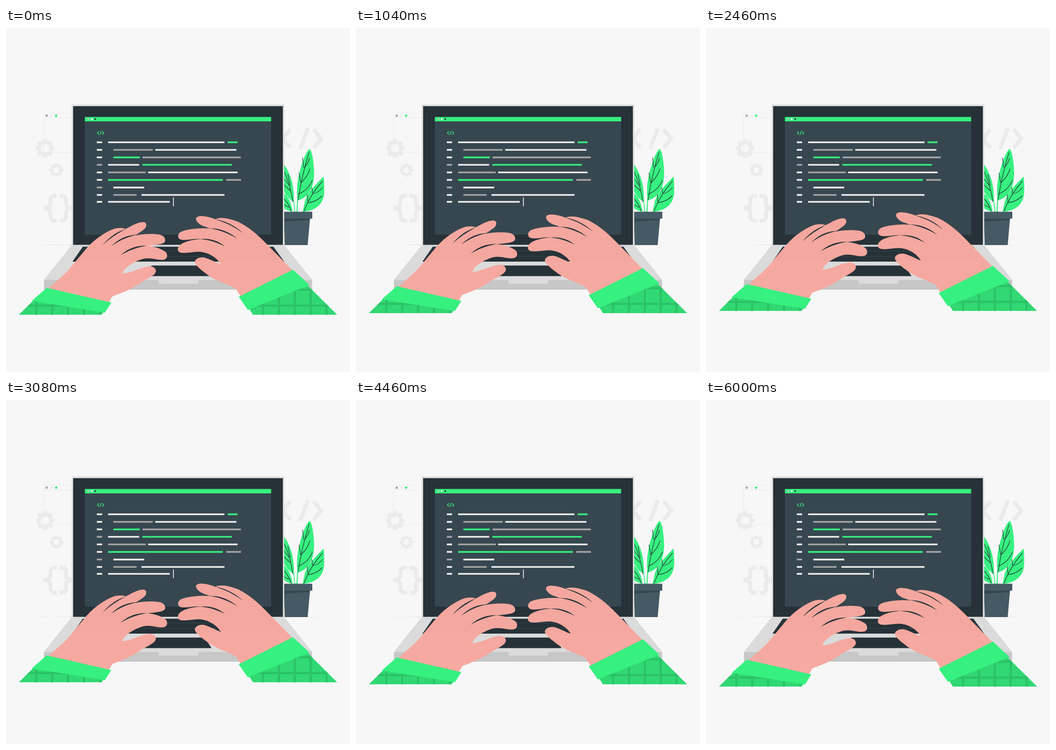
An HTML page that plays this animation: 748 px wide and 748 px high, repeating every 6040 ms.

```html
<!DOCTYPE html>
<html lang="en">
<head>
<meta charset="utf-8">
<title>Typing on a laptop</title>
<style>
  html, body { margin: 0; width: 100%; height: 100%; overflow: hidden; background: #f7f7f7; }
  svg { display: block; width: 100%; height: 100%; }
  .green { fill: #36f07f; }
  .ink { fill: #263238; }
  .vein { fill: none; stroke: #263238; stroke-width: 1.2; stroke-linecap: round; }
  .faint { fill: none; stroke: #ebebeb; }
  .skin { fill: #f7a9a0; }
  .sleeve { fill: #31d873; }
  .check { fill: none; stroke: #2cc268; stroke-width: 4.6; }
</style>
</head>
<body>
<svg viewBox="0 0 748 748">
  <defs>
    <clipPath id="leftSleeve"><path d="M59 593 28 623.5H208L214 615Z"/></clipPath>
    <clipPath id="rightSleeve"><path d="M655 559 720 623.5H537L527 608Z"/></clipPath>
  </defs>

  <!-- Wall -->
  <g class="faint">
    <path d="M150 185.5H82V270.5H150M82 195.5H150"/>
    <g id="gears"></g>
    <g stroke-width="8.5">
      <path id="brace" d="M110.500 364.500H107Q96.500 364.500 96.500 375V382Q96.500 391.500 81 391.800Q96.500 392 96.500 401.500V408.500Q96.500 419 107 419H110.500"/>
      <use href="#brace" transform="matrix(-1 0 0 1 227 0)"/>
    </g>
    <path stroke-width="8.500" stroke-linejoin="round" d="M618 220.500 602 240.500 618 260.500M656.500 218 639.500 262.500M669 220.500 685.500 240.500 669 260.500"/>
  </g>
  <circle cx="88.500" cy="190.500" r="2.600" fill="#a6a6a6"/>
  <circle cx="99" cy="190.500" r="2.600" fill="#ebebeb"/>
  <circle cx="109" cy="190.500" r="2.600" class="green"/>

  <!-- Plant -->
  <g class="green">
    <path d="M600 290C617 313 627 337 626 378C612 371 606 359 600 346Z"/>
    <path d="M600 357C613 364 621 380 623 400C612 397 605 393 600 388Z"/>
    <path d="M660 263C649 271 634 320 633 348Q632 362 634 375C654 370 669 354 670 317C670 294 665 263 660 263Z"/>
    <path d="M690.500 323C675 339 658 355 650 376L645 400C675 397 692 382 692 354Q692 334 690.500 323Z"/>
    <path d="M624.500 372 627 400H629L626 372ZM633.500 368 631.500 400H634L635.500 368Z"/>
  </g>
  <path class="vein" d="M603 309Q617 336 624 378M603 326 617 344M604 340Q613 350 619 354M613 318 618 342M603 370Q614 380 620 398M604 384 615 390
    M659 270Q643 322 635 374M660 283Q657 295 649 303M645 282 647 303M661 306Q656 323 641 337M637 315 641 337M666 331Q658 352 636 361
    M688 333Q662 362 648 398M688 347Q680 357 670 360M665 347 667 361M687 365Q677 377 657 380M655 362 657 380"/>
  <path fill="#455a64" d="M604 399.500H666V414.500H661L656 472H606Z"/>
  <path fill="#37474f" d="M604 414.500H661L660.500 417.500 604 421Z"/>
  <path fill="#263238" opacity=".55" d="M62 471.700 374 471 687 471.700 374 472.300Z"/>

  <!-- Laptop -->
  <path fill="#dbdbdb" d="M143 166.500H605V472L666 548H82L143 472Z"/>
  <path class="ink" d="M146 170H602V471.500H146Z"/>
  <path fill="#37474f" d="M171.500 193.500H576.500V449.500H171.500Z"/>
  <path class="green" d="M171.500 193.500H576.500V203H171.500Z"/>
  <circle cx="179" cy="198" r="1.900" fill="#c7c7c7"/>
  <circle cx="186.500" cy="198" r="1.900" fill="#fafafa"/>
  <circle cx="194" cy="198" r="1.900" class="ink"/>
  <path fill="none" stroke="#36f07f" stroke-width="1.500" d="M202 224.700 198.800 228.200 202 231.700M207.300 224 204.200 232.200M209.300 224.700 212.500 228.200 209.300 231.700"/>
  <g id="code" stroke-width="3.700"></g>
  <path fill="#fafafa" d="M363.200 368.500H364.800V387.500H363.200Z"/>
  <path class="ink" d="M167 475.500H581.500L605 508H144.500ZM316.500 516.500H432L447 539.500H301.500Z"/>
  <path fill="none" stroke="#37474f" d="M160 485H588M152 496.500H596"/>
  <path fill="#c7c7c7" d="M82.500 548H665.500V569H82.500Z"/>
  <path fill="#dbdbdb" d="M331 548H419L417 556H333Z"/>

  <!-- Arms -->
  <g id="arms">
    <g opacity=".985">
      <path class="skin" d="M90 569C107 552 122 541 135 527L176 478C194 458 218 442 237 436Q253 433 260 437C272 431 286 422 298 422C306 422 307 430 302 436C295 443 287 446 282 451C300 447 318 447 333 449C343 451 347 457 346 463C345 470 331 471 303 474C320 473 341 481 348 488C353 495 350 503 342 504C330 506 314 498 298 502C280 507 257 520 253 534C273 533 295 519 313 518C325 519 330 528 322 536C313 544 299 549 288 557C270 570 248 577 231 584L222 600Z"/>
      <path class="skin" d="M624 528 573 476C552 454 531 434 504 421C485 414 465 410 456 416C443 411 424 406 415 411C409 417 419 428 433 432L444 436C419 434 389 438 379 444C372 449 373 458 380 460C391 463 409 457 424 459C403 460 381 466 375 476C371 484 376 489 385 489C400 490 414 484 430 488C445 491 461 502 467 514C455 509 442 502 431 499C418 497 409 504 411 511C416 521 430 530 440 538C459 551 482 557 500 567L512 587Z"/>
    </g>
    <path class="ink" d="M210 472C222 457 239 444 260 437C243 447 226 457 210 472ZM229 474C246 458 261 451 287 449C263 454 247 462 229 474ZM249 494C264 481 280 473 306 473C287 477 272 481 249 494Z
      M455 416C477 419 500 431 515 446C496 432 478 423 455 416ZM442 435.500C466 435 487 444 503 458C484 447 466 439 442 435.500ZM423 459C444 457 462 463 476 475C458 466 444 461 423 459Z"/>
    <g clip-path="url(#leftSleeve)">
      <path class="sleeve" d="M20 550H230V624H20Z"/>
      <path class="check" d="M20 603.500H230M66 550V624M100.500 550V624M135 550V624M169.500 550V624M204 550V624"/>
    </g>
    <g clip-path="url(#rightSleeve)">
      <path class="sleeve" d="M500 550H730V624H500Z"/>
      <path class="check" d="M500 603.500H730M500 569H730M559 550V624M593.500 550V624M628 550V624M662.500 550V624M697 550V624"/>
    </g>
    <path class="green" d="M88.500 565 229 597 215 619 56 593.500ZM624 525.500 660 559 526 613 506 584.500Z"/>
  </g>
</svg>
<script>
  const byId = id => document.getElementById(id);

  function gear(x, y, r) {
    const teeth = Array.from({ length: 8 }, (_, i) =>
      `<path transform="rotate(${i * 45})" fill="#ebebeb" stroke="none" d="M-.29-.65-.2-1H.2L.29-.65Z"/>`);
    return `<g transform="translate(${x} ${y}) scale(${r})">${teeth.join('')}<circle r=".61" stroke-width=".32"/></g>`;
  }
  byId('gears').innerHTML = gear(85, 262, 20.5) + gear(109.5, 309, 14.5);

  // Each row: y, marker colour, then colour / start / end of every bar.
  const colours = { w: '#f0f0f0', a: '#a6a6a6', g: '#36f07f' };
  const rows = [
    [248.5, 'w', 'w', 222, 475, 'g', 482, 503.5],
    [265, 'w', 'a', 233.5, 319, 'w', 324.5, 501],
    [281.3, 'w', 'g', 233.5, 291, 'a', 297, 510.5],
    [297.5, 'a', 'w', 222, 289.5, 'g', 296.5, 491],
    [314, 'w', 'a', 222, 304, 'w', 309, 503.5],
    [330.3, 'w', 'g', 222, 471.5, 'a', 479, 511],
    [346.8, 'a', 'w', 233.5, 300.5],
    [363, 'w', 'a', 233.5, 284, 'w', 294.5, 475],
    [378, 'w', 'w', 222, 356]
  ];
  const bar = (y, colour, from, to) => `<path stroke="${colours[colour]}" d="M${from} ${y}H${to}"/>`;
  byId('code').innerHTML = rows.map(([y, marker, ...bars]) => {
    let out = bar(y, marker, 197.5, 209);
    for (let i = 0; i < bars.length; i += 3) out += bar(y, ...bars.slice(i, i + 3));
    return out;
  }).join('');

  const LOOP = 6040, LIFT = 10;
  const arms = byId('arms');
  const start = performance.now();
  function draw() {
    const phase = (performance.now() - start) % LOOP / LOOP;
    const lift = LIFT * (1 - Math.abs(1 - 2 * phase));
    arms.setAttribute('transform', `translate(0 ${-lift})`);
    requestAnimationFrame(draw);
  }
  draw();
</script>
</body>
</html>
```
